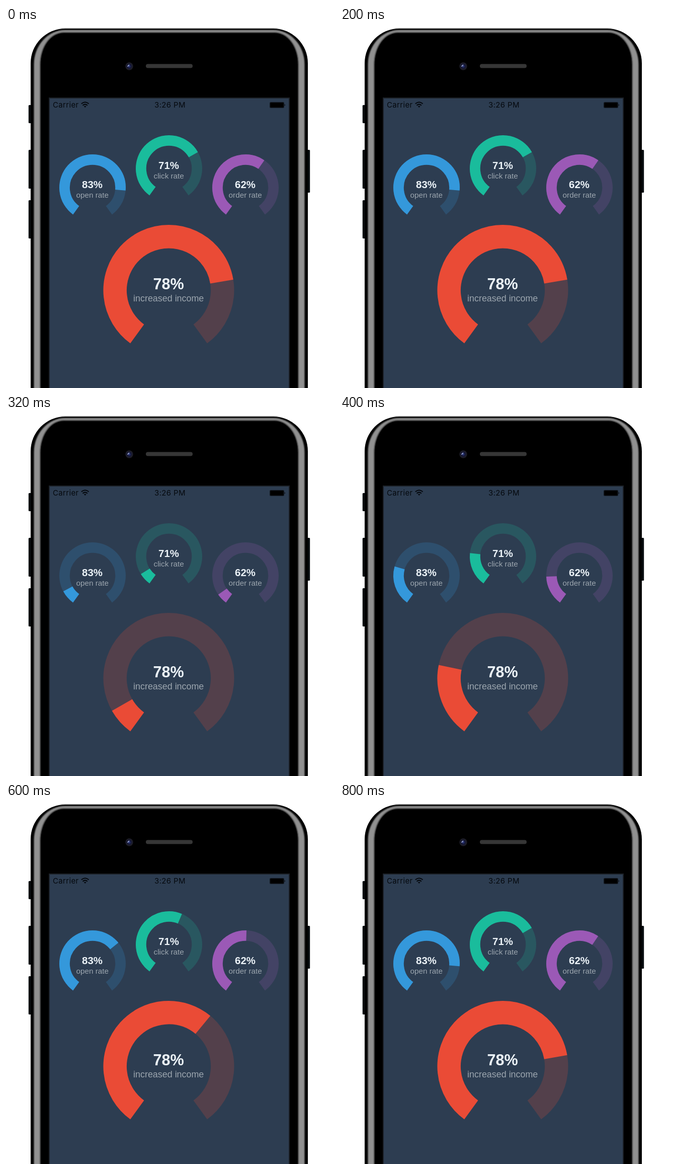
These frames come from a looping animation (652 by 715 pixels, 840 ms). An HTML page:

```html
<!DOCTYPE html>
<html lang="en">
<head>
<meta charset="utf-8">
<title>Rate gauges</title>
<style>
  html, body { margin: 0; width: 100%; height: 100%; overflow: hidden; background: #fff; }
  svg { display: block; width: 652px; height: 715px; }
  .status { font: 15px Inter, Roboto, sans-serif; letter-spacing: .35px; fill: #05090e; }
  .gauge text { font-family: "Liberation Sans", Arial, sans-serif; text-anchor: middle; }
  .gauge .value { font-weight: bold; fill: #ecf3f8; }
  .gauge .label { fill: #9ca6af; }
  .gauge path { fill: none; }
  .track { opacity: .2; }
</style>
</head>
<body>
<svg viewBox="0 0 652 715">
  <defs>
    <filter id="soft" filterUnits="userSpaceOnUse" x="40" y="-10" width="570" height="760">
      <feGaussianBlur stdDeviation="1"/>
    </filter>
    <radialGradient id="lens">
      <stop offset="0" stop-color="#3a4a9a"/>
      <stop offset=".5" stop-color="#15193f"/>
      <stop offset="1" stop-color="#1c1c28"/>
    </radialGradient>
  </defs>

  <g fill="#080d10">
    <rect x="44.8" y="153" width="8" height="36" rx="1.5"/>
    <rect x="44.8" y="242" width="8" height="77" rx="1.5"/>
    <rect x="44.8" y="342" width="8" height="76" rx="1.5"/>
    <rect x="596" y="242" width="8.2" height="85" rx="1.5"/>
  </g>

  <path d="M49 730V70A69 69 0 0 1 118 1H531A69 69 0 0 1 600 70V730Z"/>
  <g filter="url(#soft)">
    <path d="M55.5 740V72A62 68 0 0 1 117.5 4H531.5A62 68 0 0 1 593.5 72V740Z" fill="#919191"/>
    <path d="M67.5 750V72A47 63.5 0 0 1 114.5 8.5H534.5A47 63.5 0 0 1 581.5 72V750Z"/>
  </g>

  <circle cx="245" cy="76" r="7.7" fill="#1d1d27"/>
  <circle cx="245" cy="76" r="6" fill="url(#lens)"/>
  <path d="M242 76L244.5 73.5" stroke="#b4bfe6" stroke-width="1.5" stroke-linecap="round"/>
  <rect x="278" y="71.5" width="93" height="8" rx="4" fill="#363636"/>

  <rect x="85" y="138" width="479" height="590" fill="#1c2128"/>
  <rect x="87" y="140" width="475" height="590" fill="#2d3d51"/>

  <text class="status" x="93" y="158">Carrier</text>
  <text class="status" x="326" y="158" text-anchor="middle" font-weight="500">3:26 PM</text>
  <g fill="none" stroke="#05090e" stroke-width="2">
    <path d="M149.8 150.6Q157.2 144 164.6 150.6M152.5 153.7Q157.2 149.6 161.9 153.7"/>
    <path d="M157.2 158L154.8 155.6Q157.2 153.8 159.6 155.6Z" fill="#05090e" stroke="none"/>
  </g>
  <rect x="524" y="147" width="29" height="12" rx="2.5" opacity=".6"/>
  <rect x="525.5" y="148.5" width="26" height="9" rx="1"/>
  <path d="M553.7 151Q556 153 553.7 155Z"/>

  <g id="gauges"></g>
</svg>
<script>
  const LOOP = 840, TICK = 40, RESTART = 240, SWEEP = 288;
  // [ms, progress before easing]
  const PACE = [[240, .05], [400, .358], [480, .471], [600, .7265], [800, .974]];

  const small = { r: 55.6, width: 20.8, sizes: [20.4, 15.3], lines: [1, 20] };
  const large = { r: 106.8, width: 46.4, sizes: [30.6, 17.9], lines: [-2, 22] };
  const gauges = [
    { ...small, x: 172, y: 317, color: '#3498db', percent: 83, label: 'open rate' },
    { ...small, x: 324, y: 279, color: '#1abc9c', percent: 71, label: 'click rate' },
    { ...small, x: 476, y: 317, color: '#9b59b6', percent: 62, label: 'order rate' },
    { ...large, x: 323.5, y: 521, color: '#ea4b36', percent: 78, label: 'increased income' }
  ];

  function markup(g) {
    const half = Math.PI / 5;
    const dx = g.r * Math.sin(half), dy = g.r * Math.cos(half);
    const arc = `d="M${-dx} ${dy}A${g.r} ${g.r} 0 1 1 ${dx} ${dy}" pathLength="${SWEEP}"
      stroke="${g.color}" stroke-width="${g.width}"`;
    return `<g class="gauge" transform="translate(${g.x} ${g.y})">
      <path class="track" ${arc}/><path class="fill" ${arc}/>
      <text class="value" x="-.5" y="${g.lines[0]}" font-size="${g.sizes[0]}">${g.percent}%</text>
      <text class="label" x="-.3" y="${g.lines[1]}" font-size="${g.sizes[1]}">${g.label}</text></g>`;
  }

  function progress(ms) {
    if (ms < RESTART) return 1;
    const i = Math.max(1, PACE.findIndex(([end]) => ms <= end));
    const [t0, u0] = PACE[i - 1], [t1, u1] = PACE[i];
    const u = u0 + (u1 - u0) * (ms - t0) / (t1 - t0);
    return u * u * (3 - 2 * u);
  }

  const root = document.getElementById('gauges');
  root.innerHTML = gauges.map(markup).join('');
  const fills = root.querySelectorAll('.fill');
  const start = performance.now();

  function draw(now) {
    const ms = Math.max(0, now - start) % LOOP;
    const p = progress(Math.floor(ms / TICK) * TICK);
    fills.forEach((fill, i) => {
      const shown = SWEEP * gauges[i].percent / 100 * p;
      fill.setAttribute('stroke-dasharray', `${shown} ${SWEEP * 2}`);
    });
    requestAnimationFrame(draw);
  }
  draw(start);
</script>
</body>
</html>
```
